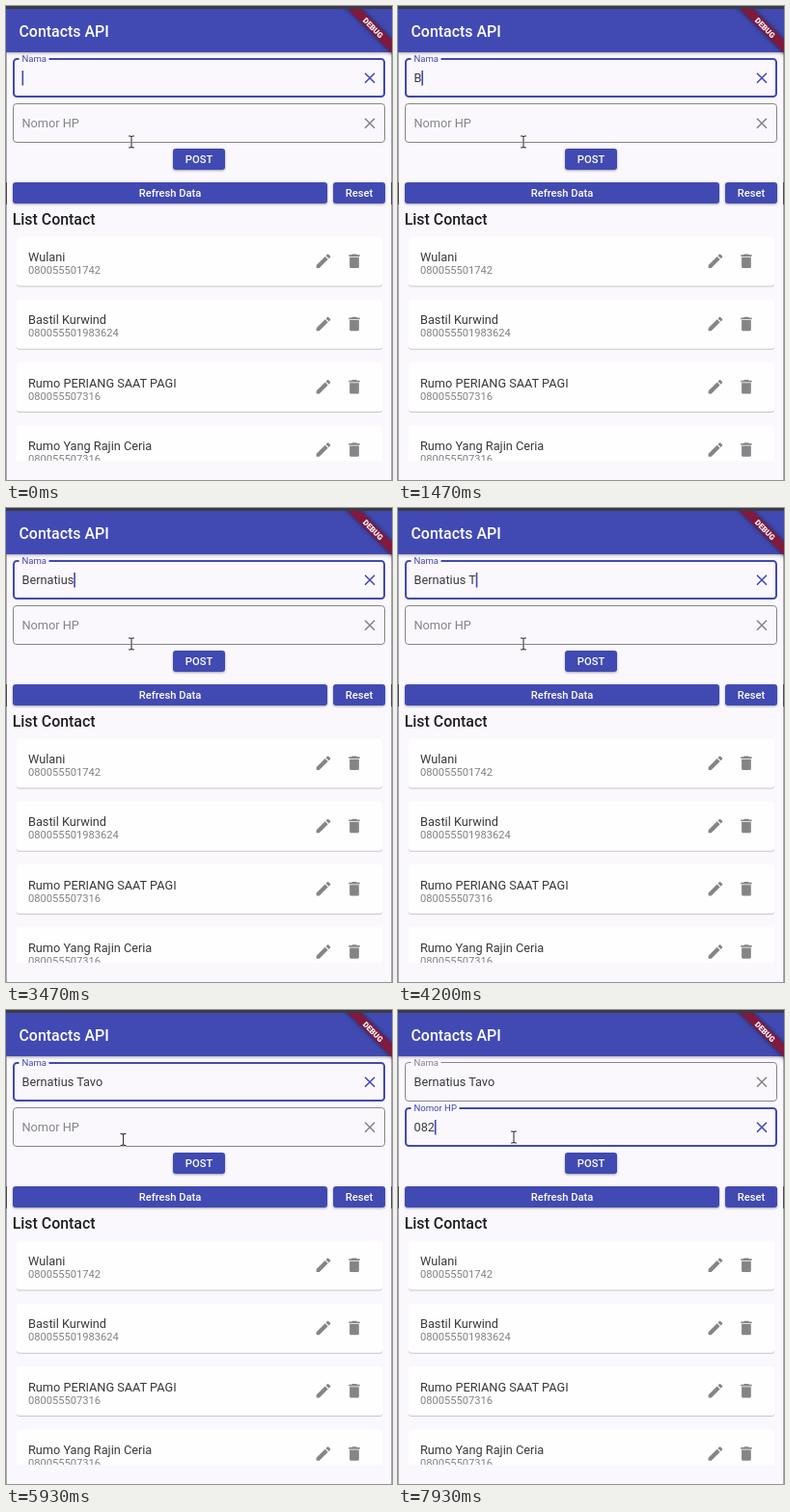
Write an HTML page that moves like this. It is 400 by 492 pixels and loops after 8 s.

```html
<!DOCTYPE html>
<html lang="id">
<head>
<meta charset="utf-8">
<title>Contacts API</title>
<style>
  html, body { margin: 0; width: 100%; height: 100%; overflow: hidden; background: #faf8fd; }
  svg { display: block; font-family: Roboto, sans-serif; }
  text { white-space: pre; }
  .button { fill: #414ab2; filter: drop-shadow(0 1.2px .8px #0005); }
  .caption { fill: #fff; font-size: 11.13px; font-weight: 500; text-anchor: middle; }
  .value, .name, .label { font-size: 12.72px; }
  .value, .name { fill: #39393c; }
  .phone { fill: #828285; font-size: 11.13px; }
  .card { fill: #fefefe; filter: drop-shadow(0 1px .5px #0003); }
  .icon { fill: #858587; }
</style>
</head>
<body>
<svg id="stage" width="400" height="492" viewBox="0 0 400 492">
  <defs>
    <clipPath id="list-clip"><rect y="230" width="400" height="242"/></clipPath>
    <clipPath id="bar-clip"><rect y="3" width="400" height="100"/></clipPath>
    <path id="edit" d="M3 17.25V21h3.75L17.81 9.94l-3.75-3.75L3 17.25zM20.71 7.04c.39-.39.39-1.02 0-1.41l-2.34-2.34c-.39-.39-1.02-.39-1.41 0l-1.83 1.83 3.75 3.75 1.83-1.83z"/>
    <path id="delete" d="M6 19c0 1.1.9 2 2 2h8c1.1 0 2-.9 2-2V7H6v12zM19 4h-3.5l-1-1h-5l-1 1H5v2h14V4z"/>
    <path id="beam" d="M-3-6H-1L0-5L1-6H3M0-5V5M-3 6H-1L0 5L1 6H3"/>
  </defs>
  <rect width="400" height="492" fill="#faf8fd"/>
  <rect y="3" width="400" height="45" fill="#414ab2" style="filter:drop-shadow(0 1.5px 1.5px #0005)"/>
  <rect width="400" height="3" fill="#3b3b45"/>
  <text x="13.5" y="32" fill="#fff" font-size="15.9" font-weight="500">Contacts API</text>
  <g clip-path="url(#bar-clip)">
    <g transform="translate(400 3) rotate(45)">
      <rect x="-40" y="22.75" width="80" height="9.75" fill="#80193c" style="filter:drop-shadow(0 0 2.4px #0008)"/>
      <text y="30.6" fill="#fff" font-size="8.1" font-weight="900" text-anchor="middle">DEBUG</text>
    </g>
  </g>
  <g id="fields"></g>
  <g id="buttons"></g>
  <text x="6.7" y="227" fill="#1d1d20" font-size="15.9" font-weight="500">List Contact</text>
  <g id="list" clip-path="url(#list-clip)"></g>
  <g stroke="#4b4b55">
    <path d="M.5 48V492M399.5 48V492" stroke-opacity=".45"/>
    <path d="M.5 183V206M399.5 183V206"/>
  </g>
  <g id="pointer" fill="none">
    <use href="#beam" stroke="#fff" stroke-width="2.4" stroke-opacity=".6"/>
    <use href="#beam" stroke="#333" stroke-width="1.1"/>
  </g>
</svg>
<script>
const LOOP = 8000, FOCUS_SWITCH = 6200, FLOAT_TIME = 170;
const ACCENT = '#414ab2', GREY = '#858588';
const $ = id => document.getElementById(id);

const contacts = [
  ['Wulani', '080055501742'],
  ['Bastil Kurwind', '080055501983624'],
  ['Rumo PERIANG SAAT PAGI', '080055507316'],
  ['Rumo Yang Rajin Ceria', '080055507316'],
];
$('list').innerHTML = contacts.map(([name, phone], i) => `
  <g transform="translate(0 ${i * 65.25})">
    <rect class="card" x="11" y="239.5" width="379" height="51" rx="3"/>
    <text class="name" x="23" y="265">${name}</text>
    <text class="phone" x="23" y="278">${phone}</text>
    <use class="icon" href="#edit" transform="translate(319.2 255) scale(.8125)"/>
    <use class="icon" href="#delete" transform="translate(351.2 255) scale(.8125)"/>
  </g>`).join('');

const buttons = [['POST', 173, 148, 54], ['Refresh Data', 7, 183, 326], ['Reset', 339, 183, 54]];
$('buttons').innerHTML = buttons.map(([caption, x, y, w]) => `
  <rect class="button" x="${x}" y="${y}" width="${w}" height="22" rx="3"/>
  <text class="caption" x="${x + w / 2}" y="${y + 15.2}">${caption}</text>`).join('');

function makeField(label, y, gapWidth, content, keyTimes) {
  const g = document.createElementNS('http://www.w3.org/2000/svg', 'g');
  g.setAttribute('transform', `translate(0 ${y})`);
  g.innerHTML = `
    <rect class="border" rx="3.3" fill="none"/>
    <rect class="gap" x="13.5" y="-1" height="3.5" fill="#faf8fd"/>
    <text class="label">${label}</text>
    <text class="value" x="16.5" y="24.9"></text>
    <rect class="caret" y="13" width="1.6" height="15.5" fill="${ACCENT}"/>
    <path class="clear" d="M372 15.7l10 10m0-10l-10 10" stroke-width="1.6"/>`;
  $('fields').append(g);
  const part = name => g.querySelector('.' + name);
  return {
    gapWidth, content, keyTimes,
    border: part('border'), gap: part('gap'), label: part('label'),
    value: part('value'), caret: part('caret'), clear: part('clear'),
  };
}

const nameField = makeField('Nama', 54, 31, 'Bernatius Tavo',
  [1300, 1500, 1700, 1900, 2130, 2870, 3070, 3270, 3470, 3750, 4050, 4400, 4650, 5000]);
const phoneField = makeField('Nomor HP', 101, 50, '082', [7250, 7500, 7800]);

const clamp = v => Math.min(1, Math.max(0, v));
const ease = v => { v = clamp(v); return v * v * (3 - 2 * v); };
const mix = (a, b, k) => a + (b - a) * k;
const set = (node, attrs) => {
  for (const key in attrs) node.setAttribute(key, attrs[key]);
};

function drawField(f, t, focused, lift, focusTime) {
  const typed = f.keyTimes.filter(k => k <= t);
  const color = focused ? ACCENT : GREY;
  const line = focused ? 2 : 1;
  f.value.textContent = f.content.slice(0, typed.length);
  // The stroke grows inwards, so the outer edge stays put.
  set(f.border, {
    stroke: color, 'stroke-width': line,
    x: 7 + line / 2, y: line / 2, width: 386 - line, height: 41 - line,
  });
  set(f.clear, { stroke: color });
  set(f.label, {
    fill: color,
    transform: `translate(16.5 ${mix(25, 4.2, lift)}) scale(${mix(1, 0.75, lift)})`,
  });
  set(f.gap, { width: f.gapWidth * lift });

  // The caret restarts its blink on every key.
  const since = t - (typed.length ? typed[typed.length - 1] : focusTime);
  const shown = focused && Math.floor(since / 500) % 2 === 0;
  set(f.caret, {
    visibility: shown ? 'visible' : 'hidden',
    x: 16.5 + (typed.length ? f.value.getComputedTextLength() : 0),
  });
}

function draw(t) {
  const onPhone = t >= FOCUS_SWITCH;
  drawField(nameField, t, !onPhone, 1, -200);
  drawField(phoneField, t, onPhone, ease((t - FOCUS_SWITCH) / FLOAT_TIME), FOCUS_SWITCH);

  const move = ease((t - 5400) / 500), settle = ease((t - 5950) / 200);
  const x = mix(130, 121.5, move) - 1.5 * settle;
  const y = mix(141, 134.5, move) - 2.5 * settle;
  set($('pointer'), { transform: `translate(${x} ${y})` });
}

const start = performance.now();
function tick() {
  draw((performance.now() - start) % LOOP);
  requestAnimationFrame(tick);
}
tick();
</script>
</body>
</html>
```
